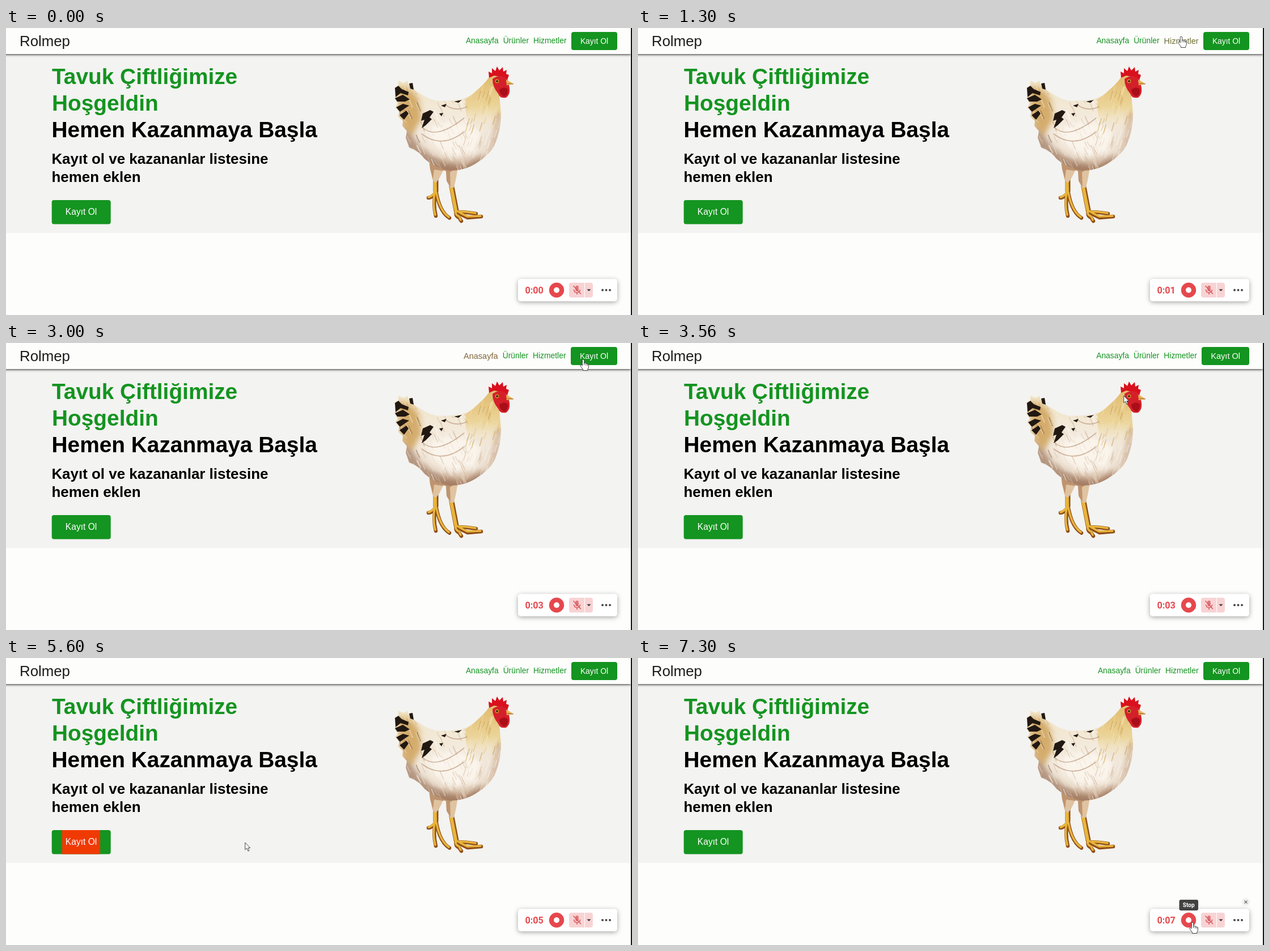
Recreate the animation shown at these times as an HTML page. Size 1104 px wide and 507 px high, loop 7340 ms.

```html
<!DOCTYPE html>
<html lang="tr">
<head>
<meta charset="utf-8">
<title>Tavuk Çiftliği</title>
<style>
html, body { margin: 0; width: 100%; height: 100%; overflow: hidden; background: #fdfdfb; }
body { position: relative; font-family: "Liberation Sans", Arial, sans-serif; }
svg { position: absolute; left: 0; top: 0; display: block; }
text { white-space: pre; }
.h1 { font-size: 38.85px; font-weight: 700; }
.h2 { font-size: 25.95px; font-weight: 700; }
.green { fill: #149420; }
nav { position: absolute; right: calc(100% - 1078px); top: 0; height: 46px; display: flex; align-items: center; gap: 8px; white-space: nowrap; color: #149420; font-size: 13.85px; line-height: 1; }
nav b { box-sizing: border-box; width: 81px; height: 32px; border-radius: 4px; background: #149420; color: #fff; font-weight: 400; text-align: center; line-height: 32px; margin-left: .5px; }
</style>
</head>
<body>
<svg width="1104" height="507" viewBox="0 0 1104 507">
  <defs>
    <filter id="soft" x="-10%" y="-30%" width="120%" height="180%"><feDropShadow dx="0" dy="2" stdDeviation="4" flood-opacity=".36"/></filter>
    <filter id="bar" x="-2%" y="-20%" width="104%" height="150%"><feDropShadow dx="0" dy="1" stdDeviation="2.3" flood-opacity=".85"/></filter>
    <filter id="blur" x="-30%" y="-30%" width="160%" height="160%"><feGaussianBlur stdDeviation="5"/></filter>
    <linearGradient id="plume" x1=".3" y1="0" x2=".4" y2="1">
      <stop offset="0" stop-color="#f1e3c2"/><stop offset=".5" stop-color="#f3ebdf"/><stop offset=".85" stop-color="#ecdfd0"/><stop offset="1" stop-color="#c9a98f"/>
    </linearGradient>
    <linearGradient id="neck" x1="0" y1="0" x2="0" y2="1">
      <stop offset="0" stop-color="#dfb96a"/><stop offset=".55" stop-color="#ecd59a"/><stop offset="1" stop-color="#f1e8da" stop-opacity="0"/>
    </linearGradient>
    <clipPath id="cta"><rect x="80.7" y="304" width="104" height="42.5" rx="4"/></clipPath>
    <clipPath id="birdClip"><use href="#birdBody"/></clipPath>
  </defs>

  <rect y="46" width="1102" height="316" fill="#f3f3f1"/>
  <rect x="-10" y="-10" width="1112" height="56" fill="#fdfdfc" filter="url(#bar)"/>
  <text x="24" y="31.5" font-size="25.8" fill="#1b1b1b">Rolmep</text>

  <text class="h1 green" x="81" y="98.7">Tavuk Çiftliğimize</text>
  <text class="h1 green" x="81" y="145.6">Hoşgeldin</text>
  <text class="h1" x="80.5" y="192.7">Hemen Kazanmaya Başla</text>
  <text class="h2" x="80.4" y="239.8">Kayıt ol ve kazananlar listesine</text>
  <text class="h2" x="80.4" y="271.8">hemen eklen</text>

  <g clip-path="url(#cta)">
    <rect x="80" y="304" width="105" height="43" fill="#149420"/>
    <rect id="fill" y="304" height="43" fill="#f03a04"/>
  </g>
  <text x="132.6" y="330" font-size="15.6" fill="#fff" text-anchor="middle">Kayıt Ol</text>

  <g id="bird" stroke-linecap="round" stroke-linejoin="round">
    <g fill="none" stroke="#8f4d18">
      <path stroke-width="9" d="M758 262L758 288M785 275L794 322"/>
      <path stroke-width="6.5" d="M757 292Q750 300 745 300M757 291Q753 312 758 332M759 291Q765 325 782 335.500M794 324Q792 332 799 335L803 341M795 325Q805 331 814 335L838 333M796 325Q812 325 829 328"/>
    </g>
    <g fill="none" stroke="#e8b53c">
      <path stroke-width="6" d="M756.500 262L757 288M784 275L793 321"/>
      <path stroke-width="3.6" d="M756 291Q750 298 745 299M756 291Q752 312 757 330M759 291Q765 323 781 334M793 323Q792 330 799 333L802 339M795 323Q805 329 814 333L837 332M796 324Q812 324 828 327"/>
    </g>
    <path fill="#e0c3a0" d="M746 232L748 248L752 268L758 274L764 266L772 250L776 254L777 270L783 282L790 282L794 264L797 246Z"/>
    <path fill="#a8764f" opacity=".6" d="M746 234L748 250L753 267L755 250L768 252L776 252L777 270L784 281L783 255L797 246L790 244Z"/>
    <path id="birdBody" fill="url(#plume)" d="M852 87Q842 101 830 110Q818 122 803 126Q778 130 757 128Q742 124 731 116L719 109L717 97L710 100L708 93L701 97L692 93L692 102L685 105L688 116L685 125L691 133L686 140L694 148L691 156L700 164L699 173L707 182L705 194L711 211Q728 217 738 231Q757 247 781 252Q809 252 829 239Q852 225 861 208Q873 183 873 151L870 119L885 101L879 84Q862 78 852 87Z"/>
    <g clip-path="url(#birdClip)">
      <path fill="url(#neck)" d="M850 82Q837 110 811 125Q807 154 821 173Q843 194 869 181L875 146L874 114L882 87Z"/>
      <path filter="url(#blur)" fill="#8d6247" opacity=".6" d="M696 172L712 180Q722 206 746 222Q776 242 812 242L842 224L838 252L774 264L706 222Z"/>
      <path filter="url(#blur)" fill="#cfa25a" opacity=".85" d="M688 104L712 105L729 128L733 160L716 190L697 172Z"/>
      <path filter="url(#blur)" fill="#b99070" opacity=".5" d="M866 150L878 150L868 210L846 234L858 194Z"/>
      <path filter="url(#blur)" fill="#fbf6ee" opacity=".9" d="M742 178Q796 152 838 184L832 216L790 228L752 208Z"/>
      <g id="feathers" fill="none"></g>
      <path fill="none" stroke="#b58b6c" stroke-width="1.6" opacity=".6" d="M735 176Q759 198 808 159M733 187Q768 214 807 184M774 135Q792 149 813 139"/>
    </g>
    <g fill="#211812">
      <path d="M686 106L692 102L698 108L710 113L709 119L696 115L687 122Z"/>
      <path d="M686 124L700 118L712 126L704 130L690 130Z"/>
      <path d="M688 140L700 134L711 137L702 143L695 148Z"/>
      <path d="M694 154L706 146L710 151L702 162Z"/>
      <path d="M711 98L717 97L719 109L713 107Z"/>
      <path d="M735 151L748 145L754 148L747 158L751 161L740 172L733 177L738 162L732 164Z"/>
      <path d="M767 137L777 134L774 140ZM764 151L771 150L768 156ZM790 130L804 127L798 132Z"/>
    </g>
    <path fill="#d9101d" d="M852 88L851 77L857 80L857 71L863 76L866 68L870 75L876 69L877 77L883 74L882 81L887 83L884 92L875 87L861 84Z"/>
    <path fill="#d4202a" d="M858 90Q872 80 884 90L887 101Q891 116 882 123Q871 125 868 116Q858 104 858 90Z"/>
    <path fill="#a90e19" d="M870 109Q879 102 885 108Q886 119 879 121Q871 119 870 109Z"/>
    <path fill="#e7b45a" d="M882 91L896 99L883 101Z"/>
    <path d="M884 98L894 99" stroke="#9b6422"/>
    <circle cx="866" cy="94" r="3.4" fill="#d28a2c"/><circle cx="866" cy="94" r="1.7" fill="#24150f"/>
  </g>

  <g id="panel">
    <rect x="903" y="443.5" width="175" height="39" rx="5" fill="#fff" filter="url(#soft)"/>
    <text id="clock" x="915.4" y="469" font-family="Roboto, sans-serif" font-weight="700" font-size="16.2" fill="#e5484d">0:00</text>
    <circle cx="971" cy="463" r="13.2" fill="#e5484d"/><circle cx="971" cy="463" r="5" fill="#fff"/>
    <path fill="#f8d3d4" d="M997 450H1020V476H997Q993 476 993 472V454Q993 450 997 450ZM1021 450H1031Q1035 450 1035 454V472Q1035 476 1031 476H1021Z"/>
    <rect x="1004.2" y="455" width="5.6" height="10" rx="2.8" fill="#e0777b"/>
    <path d="M1001.5 462Q1002 467.5 1007 467.5T1012.5 462M1007 468V471M1000.500 455.500L1014 470" fill="none" stroke="#d9575c" stroke-width="1.5"/>
    <path d="M1024.500 461.500H1031.500L1028 465Z" fill="#333"/>
    <g fill="#484848"><circle cx="1052" cy="463" r="2"/><circle cx="1058.500" cy="463" r="2"/><circle cx="1065" cy="463" r="2"/></g>
  </g>
  <g id="close">
    <circle cx="1072" cy="431" r="7" fill="#f0f0f0"/>
    <path d="M1069.500 428.500L1074.500 433.500M1074.500 428.500L1069.500 433.500" stroke="#666" stroke-width="1.1"/>
  </g>
  <g id="tip">
    <rect x="954.500" y="427" width="33.500" height="19" rx="3" fill="#424242"/>
    <text x="971.2" y="440" font-family="Roboto, sans-serif" font-weight="700" font-size="10" fill="#fff" text-anchor="middle">Stop</text>
  </g>
  <rect x="1102" width="2" height="507" fill="#161616"/>
</svg>

<nav><span>Anasayfa</span><span>Ürünler</span><span>Hizmetler</span><b>Kayıt Ol</b></nav>

<svg width="1104" height="507" viewBox="0 0 1104 507">
  <g id="cursor" fill="#fff" stroke="#333" stroke-width=".9" stroke-linejoin="round">
    <path id="arrow" d="M0 0V12.500L3 9.800L5.200 15L7.300 14L5.200 9.200H9Z"/>
    <g id="hand">
      <path d="M-1.700 1.500Q-1.700 0 0 0T1.700 1.500V6.500Q4.400 5.500 4.800 7.300Q7 6.600 7.400 8.300Q9.400 8 9.400 10V13Q9.400 15.500 7.800 17.300V19.500H-.5V17.800L-4.700 12Q-5.800 9.600-4.200 9.300Q-3 9.100-1.700 11Z"/>
      <path fill="none" d="M1.700 6.500V10M4.800 7.300V10.500M7.400 8.300V11"/>
    </g>
  </g>
</svg>

<script>
const LOOP = 7340, GROW = 300, FILL = 500;
const $ = id => document.getElementById(id);
const links = [...document.querySelectorAll("nav span")];
const join = document.querySelector("nav b");

// [enter, leave] times of each pointer target
const hover = {
  links: [[2350, 2855], [1710, 2330], [1165, 1700]],
  join: [2915, 3420],
  cta: [4190, 5400],
  panel: [6560, LOOP],
  stop: [6660, LOOP]
};

// time, x, y of the pointer tip
const path = [
  [250, 1000, 430], [850, 985, 130], [1165, 966, 32], [1300, 958, 15],
  [1500, 950, 18], [1700, 926, 22], [1850, 896, 22], [2100, 875, 23],
  [2340, 867, 24], [2450, 845, 22], [2700, 838, 24], [2855, 862, 33],
  [2920, 996, 40], [3000, 1018, 29], [3250, 1040, 22], [3420, 1020, 42],
  [3800, 580, 180], [4100, 160, 300], [4200, 109, 323], [4700, 125, 325],
  [5200, 150, 326], [5400, 186, 326], [5600, 421, 326], [6000, 700, 380],
  [6500, 940, 450], [6800, 974, 464], [7300, 978, 467]
];

const ease = x => { x = Math.min(1, Math.max(0, x)); return x * x * (3 - 2 * x); };
const inside = (t, [a, b]) => t >= a && t < b;
const level = (t, [a, b], d) => ease((t - a) / d) - ease((t - b) / d);
const mix = (a, b, p) => a + (b - a) * p;

// Short seeded strokes: brown in the tail, gold on the neck, pale on the body
function drawFeathers() {
  let seed = 7;
  const rnd = () => (seed = seed * 16807 % 2147483647) / 2147483647;
  let out = "";
  for (let i = 0; i < 260; i++) {
    const x = mix(686, 874, rnd()), y = mix(95, 250, rnd()), r = rnd();
    const tones = x < 732 && y < 190 ? ["#7d5229", "#f7ecd4", "#c79a52"]
      : x > 810 && y < 175 ? ["#c69a50", "#f5e6ba", "#e0bd74"]
      : ["#d3b79d", "#fdf9f2", "#eddfcb"];
    const dx = x > 810 ? -4 : 6;
    out += `<path d="M${x} ${y}q${dx / 2} 8 ${dx} ${8 + 8 * r}" stroke="${tones[i % 3]}" stroke-width="${1 + r}" opacity=".5"/>`;
  }
  $("feathers").innerHTML = out;
}

function point(t) {
  let i = 1;
  while (i < path.length - 1 && path[i][0] < t) i++;
  const a = path[i - 1], b = path[i];
  const p = Math.min(1, Math.max(0, (t - a[0]) / (b[0] - a[0])));
  return [mix(a[1], b[1], p), mix(a[2], b[2], p)];
}

function show(el, on) { el.style.display = on ? "" : "none"; }

function draw(t) {
  links.forEach((el, i) => {
    const p = level(t, hover.links[i], GROW);
    el.style.fontSize = mix(13.85, 15.25, p) + "px";
    el.style.color = `rgb(${mix(20, 232, p)},${mix(148, 62, p)},${mix(32, 80, p)})`;
  });

  const j = level(t, hover.join, GROW);
  join.style.width = mix(81, 86, j) + "px";
  join.style.fontSize = mix(13.85, 15.25, j) + "px";

  const w = 104 * level(t, hover.cta, FILL);
  $("fill").setAttribute("x", 132.5 - w / 2);
  $("fill").setAttribute("width", w);

  $("clock").textContent = "0:0" + Math.floor((t + 150) / 1000);
  show($("close"), inside(t, hover.panel));
  show($("tip"), inside(t, hover.stop));

  const [x, y] = point(t);
  const hand = [...hover.links, hover.join, hover.cta, hover.stop].some(h => inside(t, h));
  $("cursor").setAttribute("transform", `translate(${x} ${y})`);
  show($("cursor"), t >= path[0][0]);
  show($("hand"), hand);
  show($("arrow"), !hand);
}

drawFeathers();
const start = performance.now();
function tick() {
  draw((performance.now() - start) % LOOP);
  requestAnimationFrame(tick);
}
tick();
</script>
</body>
</html>
```
